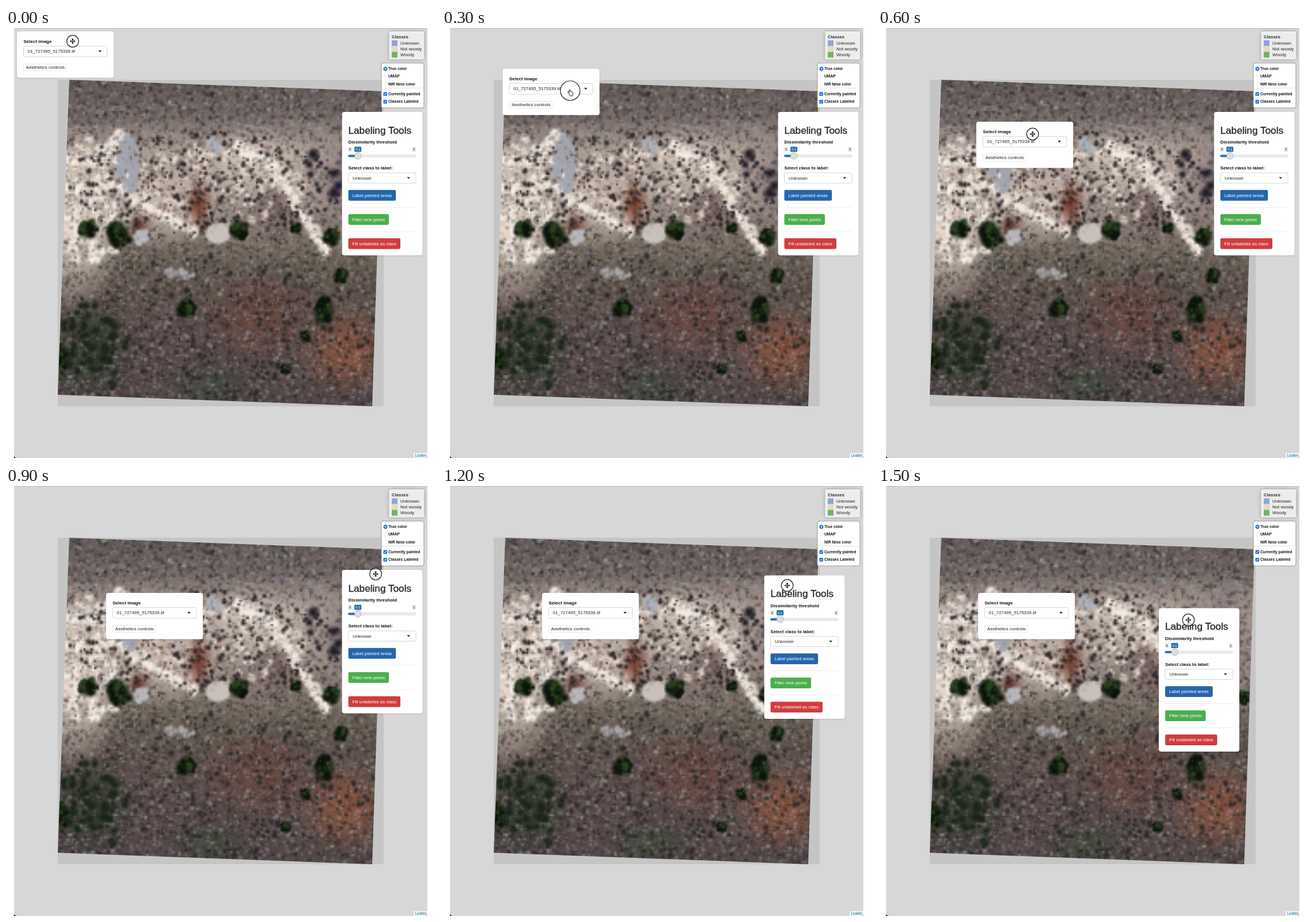
Animation, 748 px wide and 748 px high, one loop 1800 ms. Source, as an HTML page with a canvas:

```html
<!DOCTYPE html>
<html lang="en">
<head>
<meta charset="utf-8">
<title>Labeling Tools</title>
<style>
html, body { margin: 0; width: 100%; height: 100%; overflow: hidden; background: #fff; }
body { position: relative; }
.map { position: absolute; left: 14px; top: 0; width: 719px; height: 748px; background: #d7d7d7; }
.tile { position: absolute; left: 76px; top: 90px; width: 567px; height: 568px; background: #c5c5c5; }
canvas { display: block; width: 567px; height: 568px;
  clip-path: polygon(20px 0, 565px 20px, 547px 568px, 0 548px); }
svg { position: absolute; left: 0; top: 0; }
text { font: 7.85px "Liberation Sans", Arial, sans-serif; fill: #222; white-space: pre; }
.b { font-weight: bold; fill: #111; }
.h { font-size: 17.2px; stroke: #222; stroke-width: .3; }
.s { font-size: 5.6px; }
.l { font-size: 6.7px; font-weight: bold; fill: #111; }
.w { fill: #fff; }
.panel { fill: #fff; filter: drop-shadow(0 1px 1px #0002); }
.field { fill: #fff; stroke: #ccc; stroke-width: .8; }
.hr { stroke: #e8e8e8; stroke-width: .8; }
</style>
</head>
<body>
<div class="map"><div class="tile"><canvas id="photo" width="189" height="189"></canvas></div></div>
<svg width="748" height="748" viewBox="0 0 748 748">
  <path d="M14 .4H733" stroke="#bdbdbd" stroke-width=".8"/>
  <path d="M14 743v5h5q-5 0-5-5M733 743v5h-5q5 0 5-5"/>

  <rect x="666.5" y="6" width="60.5" height="48.5" rx="3" fill="#fffc" style="filter:drop-shadow(0 0 3px #0005)"/>
  <text class="b" x="671" y="17.5" style="font-size:7.7px;fill:#333">Classes</text>
  <g id="legend"></g>

  <rect x="653" y="61" width="74" height="78" rx="3" fill="#fff" stroke="#999"/>
  <path d="M653.5 104.5h73" stroke="#ddd" stroke-width=".8"/>
  <g id="layers"></g>

  <path d="M709 739.5h24v8.5h-24z" fill="#fffb"/>
  <text x="711.5" y="746.2" style="font-size:6.5px;fill:#0078a8">Leaflet</text>

  <g id="picker">
    <rect class="panel" x="19" y="6" width="168.5" height="80.5" rx="4"/>
    <text class="b" x="30.5" y="25.5" style="font-size:8px">Select image</text>
    <rect class="field" x="30.5" y="31.5" width="145.5" height="18.5" rx="2"/>
    <text x="37.8" y="43.4">01_727495_5175339.tif</text>
    <path d="M160.7 39h5.6l-2.8 3.2z" fill="#222"/>
    <rect class="field" x="30.5" y="62.5" width="75" height="12" rx="2" style="stroke:#e2e2e2"/>
    <text x="34.8" y="71" style="font-size:8px">Aesthetics controls</text>
  </g>

  <g id="tools">
    <rect class="panel" x="584.5" y="146" width="140" height="249.5" rx="4"/>
    <text class="h" x="595.5" y="183.5">Labeling Tools</text>
    <text class="b" x="595.5" y="201">Dissimilarity threshold</text>
    <rect x="595.5" y="207" width="6" height="8" rx="1.5" fill="#e1e1e1"/>
    <rect x="706.5" y="207" width="6.5" height="8" rx="1.5" fill="#e1e1e1"/>
    <rect x="606" y="206.5" width="12.2" height="9" rx="1.5" fill="#2d70b8"/>
    <text class="s" x="597" y="213">0</text>
    <text class="s w" x="608.3" y="213">0.1</text>
    <text class="s" x="708.3" y="213">1</text>
    <rect x="595.8" y="220.7" width="117" height="3.6" rx="1.8" fill="#eee" stroke="#ccc" stroke-width=".7"/>
    <path d="M597 222.5h15" stroke="#2d70b8" stroke-width="3.8" stroke-linecap="round"/>
    <circle cx="612.2" cy="222.5" r="5.8" fill="#dedede" stroke="#aaa" stroke-width=".8"/>
    <text class="b" x="595.5" y="246">Select class to label:</text>
    <rect class="field" x="595.5" y="252" width="117.5" height="18" rx="2"/>
    <text x="603" y="263.7">Unknown</text>
    <path d="M697.5 259.4h5.6l-2.8 3.2z" fill="#222"/>
    <path class="hr" d="M595.5 312h117.5M595.5 354h117.5"/>
    <g id="buttons"></g>
  </g>

  <g id="cursor">
    <circle id="ring" fill="#fff8" stroke="#222" stroke-width="1.2"/>
    <path id="move" d="M-3.2 0H3.2M0-3.2V3.2M-2.5-1.4-4 0l1.5 1.4M2.5-1.4 4 0 2.5 1.4M-1.4-2.5 0-4l1.4 1.5M-1.4 2.5 0 4l1.4-1.5" fill="none" stroke="#111" stroke-width="1.2"/>
    <path id="hand" d="M-1.2 7-4 2.5q-.6-1.6 1-.8L-1.6 3V-1.2q.9-1.4 1.8 0V2q1-.7 1.7.1 1-.5 1.6.4 1.1-.2 1.3.8v2L4 9H-.5z" fill="#fff" stroke="#111" stroke-width=".9"/>
  </g>
</svg>
<script>
const $ = id => document.getElementById(id);
const fill = (id, items, draw) => $(id).innerHTML = items.map(draw).join('');

fill('legend', [['Unknown', '#8da5da'], ['Not woody', '#ead8c6'], ['Woody', '#70b568']],
  ([name, color], i) => `<rect x="671" y="${21.5 + 10 * i}" width="10" height="10" fill="${color}"/>
    <text x="686" y="${29 + 10 * i}">${name}</text>`);

fill('layers', ['True color', 'UMAP', 'NIR false color', 'Currently painted', 'Classes Labeled'], (name, i) => {
  const isCheck = i > 2;
  const y = 71 + 13.4 * i + (isCheck ? 3.5 : 0);
  const mark = isCheck
    ? `<rect x="656.5" y="${y - 3.2}" width="6.5" height="6.5" rx="1.2" fill="#1672e0"/>
       <path d="M658 ${y}l1.4 1.6 2.2-3.3" fill="none" stroke="#fff"/>`
    : i ? `<circle cx="660" cy="${y}" r="3.2" fill="#fff" stroke="#ddd" stroke-width=".6"/>`
        : `<circle cx="660" cy="${y}" r="2.4" fill="#fff" stroke="#1672e0" stroke-width="2.2"/>`;
  return `${mark}<text class="l" x="665" y="${y + 2}">${name}</text>`;
});

fill('buttons', [['Label painted areas', '#2566ab'], ['Filter lone pixels', '#4cae4c'], ['Fill unlabeled as class', '#cf3d40']],
  ([name, color], i) => `<g transform="translate(595.5 ${281.7 + 42 * i})">
    <rect height="18.7" rx="2.3" fill="${color}"/><text class="w" x="6.9" y="12.2">${name}</text></g>`);
for (const label of $('buttons').querySelectorAll('text'))
  label.previousElementSibling.setAttribute('width', label.getComputedTextLength() + 13.8);

// Aerial view: soft patches and seeded scatter, in stage coordinates.
const ctx = $('photo').getContext('2d');
let seed = 7;
const rand = () => (seed = seed * 16807 % 2147483647) / 2147483647;

function blob(x, y, rx, ry, color, core = .2) {
  const g = ctx.createRadialGradient(0, 0, 0, 0, 0, 1);
  g.addColorStop(core, color);
  g.addColorStop(1, color + '00');
  ctx.save();
  ctx.translate(x, y);
  ctx.scale(rx, ry);
  ctx.fillStyle = g;
  ctx.fillRect(-1, -1, 2, 2);
  ctx.restore();
}

function scatter(x, y, rx, ry, count, size, color) {
  while (count--) {
    const angle = rand() * 2 * Math.PI, dist = Math.sqrt(rand()), r = size * (.5 + rand());
    blob(x + rx * dist * Math.cos(angle), y + ry * dist * Math.sin(angle), r, r, color);
  }
}

function trail(x1, y1, x2, y2) {
  for (let i = 0; i <= 1; i += 1 / 16)
    scatter(x1 + (x2 - x1) * i, y1 + (y2 - y1) * i, 8, 7, 4, 8, '#f6ebe0');
}

function tree(x, y, r, tall = 1) {
  blob(x, y, r, r * tall, '#18240f', .5);
  scatter(x, y, r * .8, r * .8 * tall, 14, r / 3, '#0b130b');
  scatter(x, y - r / 4, r * .6, r * .6 * tall, 5, r / 4, '#2c431f');
}

function grain(count, alpha) {
  while (count--) {
    ctx.fillStyle = `hsla(${rand() * 360},18%,${rand() < .4 ? 68 : 10}%,${rand() * alpha})`;
    ctx.fillRect(90 + rand() * 567, 90 + rand() * 568, 2 + rand() * 5, 2 + rand() * 4);
  }
}

function drawPhoto() {
  ctx.scale(1 / 3, 1 / 3);
  ctx.translate(-90, -90);
  const base = ctx.createLinearGradient(0, 90, 0, 658);
  ['#635a58', '#746967', '#b3a299', '#b3a198', '#8f8077', '#6b6157', '#60534d', '#5d4f4e', '#594b4b', '#534747']
    .forEach((color, i, all) => base.addColorStop(i / (all.length - 1), color));
  ctx.fillStyle = base;
  ctx.fillRect(90, 90, 567, 568);

  // ground
  blob(110, 330, 105, 165, '#e6d6c9');
  blob(270, 300, 110, 80, '#c9b6aa');
  blob(430, 230, 100, 60, '#d2c2b7');
  blob(600, 270, 75, 120, '#857679');
  blob(470, 320, 55, 60, '#786561');
  blob(150, 560, 80, 95, '#373e32');
  blob(360, 620, 85, 45, '#464a40');
  blob(590, 560, 85, 80, '#875440');
  blob(440, 500, 110, 85, '#694943');
  scatter(150, 300, 75, 110, 170, 8, '#f8eee4');
  scatter(370, 270, 150, 70, 130, 7, '#ecdfd4');
  blob(335, 305, 27, 52, '#7d4638');
  blob(230, 345, 26, 24, '#6f443a');
  trail(150, 235, 205, 185);
  trail(185, 275, 325, 355);
  trail(400, 205, 465, 240);
  trail(465, 240, 555, 390);
  grain(14000, .48);

  // low shrubs, then rocks
  scatter(340, 275, 250, 95, 300, 4.5, '#2d2527');
  scatter(370, 520, 270, 125, 200, 5, '#2d2929');
  scatter(150, 560, 60, 85, 60, 8, '#1c2519');
  scatter(555, 250, 35, 45, 9, 10, '#211d27');
  scatter(213, 235, 20, 50, 110, 6, '#a2a5b0');
  scatter(365, 203, 14, 13, 22, 6, '#aeb1b8');
  scatter(235, 364, 13, 13, 20, 6, '#b8b8be');
  scatter(302, 426, 30, 8, 14, 6, '#aaa8aa');
  blob(369, 357, 25, 20, '#c8c0ba', .75);

  tree(143, 350, 20);
  tree(196, 359, 24, 1.15);
  tree(405, 351, 20);
  tree(313, 486, 19);
  tree(553, 492, 21, 1.4);
  tree(567, 363, 17);
  tree(582, 432, 15);
  tree(98, 572, 14, 2);
  tree(636, 368, 14);
  tree(505, 347, 12);
  tree(487, 592, 11);
  tree(520, 535, 11);
  grain(2000, .25);
}
drawPhoto();

// Each pose lasts 300 ms: picker offset, tools offset, cursor position.
const start = [0, 0], parked = [155, 180];
const poses = [
  [start, start, [116, 23]],
  [[86.5, 65], start, [223, 109]],
  [[152, 157], start, [269, 184.5]],
  [parked, start, [643, 153]],
  [parked, [-24, 9.5], [600.5, 173]],
  [parked, [-96, 66.5], [540, 233]]
];
const place = (id, at) => $(id).setAttribute('transform', `translate(${at})`);

function render() {
  const step = Math.floor(performance.now() / 300) % poses.length;
  const [picker, tools, cursor] = poses[step];
  const pointing = step === 1;
  place('picker', picker);
  place('tools', tools);
  place('cursor', cursor);
  $('ring').setAttribute('r', pointing ? 17 : 10.3);
  $('hand').style.display = pointing ? '' : 'none';
  $('move').style.display = pointing ? 'none' : '';
  requestAnimationFrame(render);
}
render();
</script>
</body>
</html>
```
